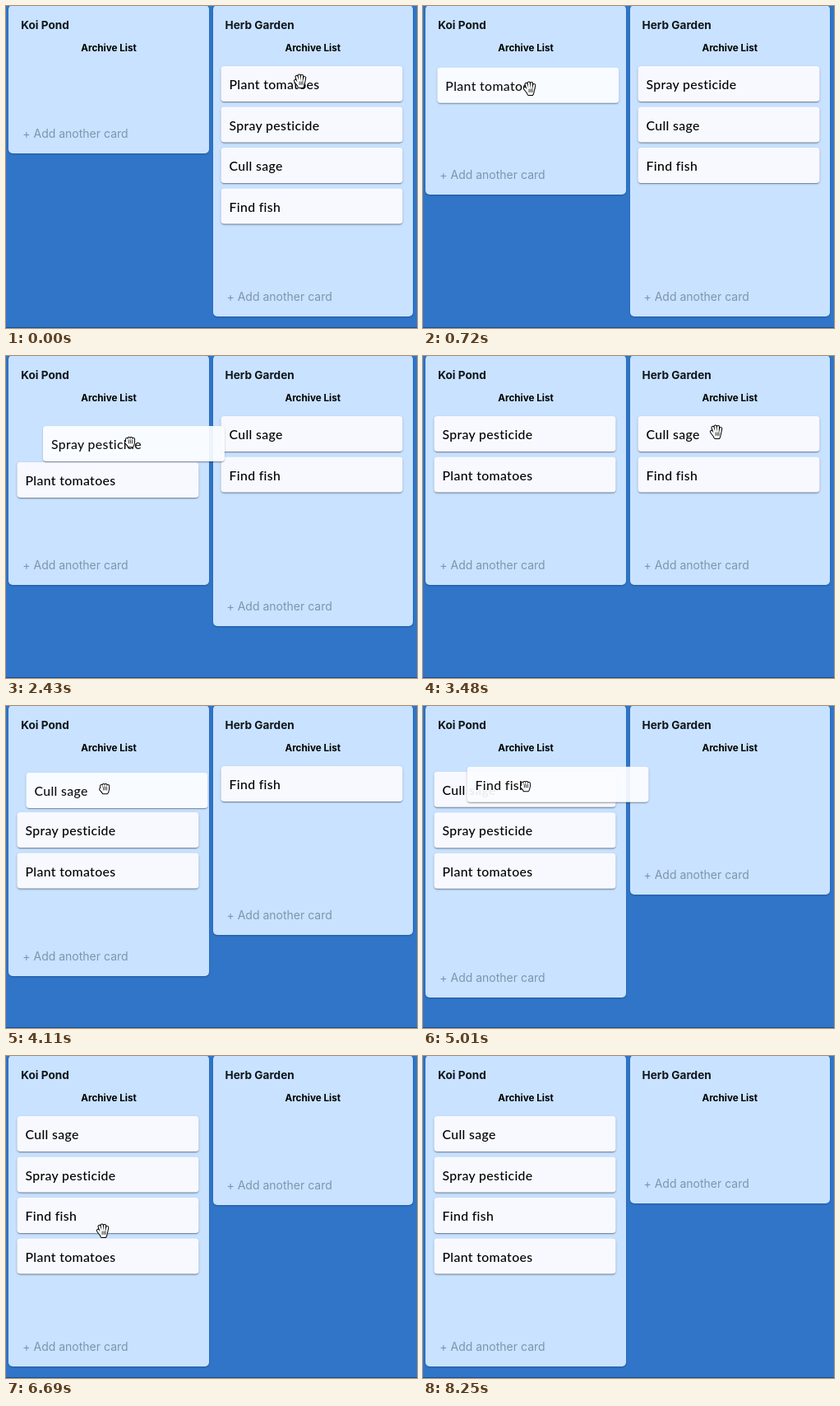
An HTML page that plays this animation: 500 by 391 pixels, repeating every 8.28 s.

```html
<!DOCTYPE html>
<html lang="en">
<head>
<meta charset="utf-8">
<title>Card board</title>
<style>
  html, body { margin: 0; width: 100%; height: 100%; overflow: hidden; background: #3075c8; }
  body::after { content: ""; position: absolute; left: 0; right: 0; top: 390px; height: 1px; background: #1c4d8c; }
  .column, .card, #cursor { position: absolute; left: 0; top: 0; }
  .column {
    top: -1px; width: 243.5px; border-radius: 5px; background: #c8e2ff;
    box-shadow: 0 1px 2px rgba(9, 35, 70, .35);
    font-family: Inter, Roboto, sans-serif; white-space: nowrap;
  }
  .column > * { position: absolute; line-height: 20px; }
  .title { left: 15px; top: 14px; font-size: 13.6px; font-weight: 700; color: #10151c; }
  .archive { left: 0; right: 0; top: 42px; text-align: center; font-size: 11.7px; font-weight: 700; color: #000; }
  .add { left: 17px; bottom: 14px; font-size: 14px; color: #7f94ad; }
  .card {
    box-sizing: border-box; width: 221px; height: 43px; padding-left: 10px; border-radius: 4px;
    background: #f8f9ff;
    box-shadow: 0 2px 1px -1px rgba(0, 0, 0, .2), 0 1px 1px rgba(0, 0, 0, .16), 0 1px 3px rgba(0, 0, 0, .18);
    font: 500 15.8px/43px Lato, sans-serif; letter-spacing: .35px; color: #000; white-space: nowrap;
  }
  .card.moving { z-index: 2; opacity: .93; background: #fcfdff; }
  #cursor { z-index: 3; overflow: visible; }
  #cursor path { fill: none; stroke-linecap: round; stroke-linejoin: round; }
  #cursor .edge { stroke: #000; stroke-width: 4.2; }
  #cursor .skin { stroke: #fff; stroke-width: 2.2; fill: #fff; }
  #cursor .crease { stroke: #000; stroke-width: .8; }
</style>
</head>
<body>
<svg id="cursor" width="1" height="1">
  <g id="open"></g>
  <g id="closed"></g>
</svg>
<script>
const LOOP = 8280, LAG = 60, DROP_TIME = 320, SHIFT_TIME = 200;
const LEFT = 13.5, RIGHT = 261.5, TOP = 73, STEP = 49.5, DISPLACED = 56;

// One drag per card; `passes` are the times it moves below each card in the left list.
const drags = [
  { text: 'Plant tomatoes',  grab: 30,   enter: 235,  drop: 660,  slot: 0, passes: [] },
  { text: 'Spray pesticide', grab: 1680, enter: 1900, drop: 2670, slot: 0, passes: [] },
  { text: 'Cull sage',       grab: 3660, enter: 3825, drop: 4130, slot: 0, passes: [] },
  { text: 'Find fish',       grab: 4890, enter: 4968, drop: 6240, slot: 2, passes: [5540, 5980] }
];

// Pointer path: time, x, y
const path = [
  [0, 358, 91], [30, 358, 91], [480, 130, 100], [750, 130, 100], [1470, 368, 92],
  [1680, 368, 92], [1740, 302, 102], [2160, 160, 106], [2430, 151, 104], [2520, 149, 104],
  [2760, 149, 104], [3480, 357, 92], [3660, 357, 92], [4000, 120, 100], [4200, 120, 100],
  [4650, 362, 100], [4890, 362, 100], [4950, 155, 101], [5010, 125, 97], [5220, 104, 95],
  [5370, 104, 95], [5790, 124, 163], [5850, 124, 163], [6120, 118, 212], [7260, 118, 212],
  [7500, 150, 300]
];

const clamp = v => Math.min(1, Math.max(0, v));
const mix = (a, b, u) => a + (b - a) * u;

function bezier(x1, y1, x2, y2) {
  const at = (a, b, s) => 3 * a * s * (1 - s) ** 2 + 3 * b * s * s * (1 - s) + s ** 3;
  return v => {
    const x = clamp(v);
    let lo = 0, hi = 1;
    for (let i = 0; i < 24; i++) {
      const mid = (lo + hi) / 2;
      if (at(x1, x2, mid) < x) lo = mid; else hi = mid;
    }
    return at(y1, y2, (lo + hi) / 2);
  };
}
const moveEase = bezier(.2, 0, 0, 1), dropEase = bezier(.2, 1, .1, 1);
const shift = (t, start) => moveEase((t - start) / SHIFT_TIME);

function pointer(t) {
  const i = path.findIndex(key => key[0] > t);
  if (i < 0) return path.at(-1).slice(1);
  const [t0, x0, y0] = path[i - 1], [t1, x1, y1] = path[i];
  const u = 1 - (1 - (t - t0) / (t1 - t0)) ** 2;
  return [mix(x0, x1, u), mix(y0, y1, u)];
}

function makeColumn(x, title) {
  const el = document.createElement('div');
  el.className = 'column';
  el.style.left = x + 'px';
  el.innerHTML = `<div class="title">${title}</div><div class="archive">Archive List</div>
    <div class="add">+ Add another card</div>`;
  document.body.append(el);
  return el;
}
const columns = [makeColumn(3.3, 'Koi Pond'), makeColumn(251.5, 'Herb Garden')];

for (const drag of drags) {
  drag.end = drag.drop + DROP_TIME;
  drag.origin = pointer(drag.grab);
  drag.el = document.createElement('div');
  drag.el.className = 'card';
  drag.el.textContent = drag.text;
  document.body.append(drag.el);
}

const cursor = document.getElementById('cursor');
const hands = { open: document.getElementById('open'), closed: document.getElementById('closed') };
function drawHand(group, outline, creases) {
  group.innerHTML = `<path class="edge" d="${outline}"/><path class="skin" d="${outline}"/>
    <path class="crease" d="${creases}"/>`;
}
drawHand(hands.open,
  'M-6 0L-3 4M-4.4 -5L-2.4 1M-1.3 -6.5L-.5 1M2 -6L1.6 1M5.2 -3.8L4 2M-3 2L4 1.5L3.2 5.5L2.5 7H-1.5Z',
  'M-.9 1V4.5M1.1 1V4.5M3 1V4.5');
drawHand(hands.closed,
  'M-4.8 1L-3 3M-3.8 -3V1M-1.3 -4V0M1.4 -4V0M4 -3V1M-3.6 0H4L3.4 3.5L2.6 5.2H-1.6Z',
  'M-1.4 -1.2V2M.6 -1.2V2M2.6 -1.2V2');

function heldPosition(drag, t) {
  const [x, y] = pointer(Math.max(drag.grab, t - LAG));
  return [RIGHT + x - drag.origin[0], TOP + y - drag.origin[1]];
}

function cardPosition(index, t) {
  const drag = drags[index];
  const active = drags.find(d => t >= d.grab && t < d.end);
  if (drag === active) {
    if (t < drag.drop) return heldPosition(drag, t);
    const [x, y] = heldPosition(drag, drag.drop);
    const u = dropEase((t - drag.drop) / DROP_TIME);
    return [mix(x, LEFT, u), mix(y, TOP + STEP * drag.slot, u)];
  }
  if (t < drag.grab) {
    const taken = drags.filter(d => t >= d.grab).length;
    const gap = active ? DISPLACED * (1 - shift(t, active.enter + 25)) : 0;
    return [RIGHT, TOP + STEP * (index - taken) + gap];
  }
  let slot = drag.slot;
  for (const later of drags.slice(index + 1))
    if (t >= later.end && later.slot <= slot) slot++;
  let gap = 0;
  if (active) {
    const passed = active.passes[slot];
    gap = DISPLACED * (shift(t, active.enter + 25) - (passed ? shift(t, passed) : 0));
  }
  return [LEFT, TOP + STEP * slot + gap];
}

function render(t) {
  const sum = key => drags.reduce((n, d) => n + shift(t, d[key]), 0);
  [sum('enter'), 4 - sum('end')].forEach((count, i) => {
    columns[i].style.height = 180 + STEP * count + 'px';
  });

  drags.forEach((drag, i) => {
    const [x, y] = cardPosition(i, t);
    drag.el.style.transform = `translate(${x}px, ${y}px)`;
    drag.el.classList.toggle('moving', t >= drag.grab && t < drag.end);
  });

  const [x, y] = pointer(t);
  const holding = drags.some(d => t >= d.grab && t < d.drop);
  cursor.style.transform = `translate(${x}px, ${y}px)`;
  cursor.style.display = y > 270 ? 'none' : 'block';
  hands.open.style.display = holding ? 'none' : 'inline';
  hands.closed.style.display = holding ? 'inline' : 'none';
}

const start = performance.now();
function tick() {
  render((performance.now() - start) % LOOP);
  requestAnimationFrame(tick);
}
tick();
</script>
</body>
</html>
```
